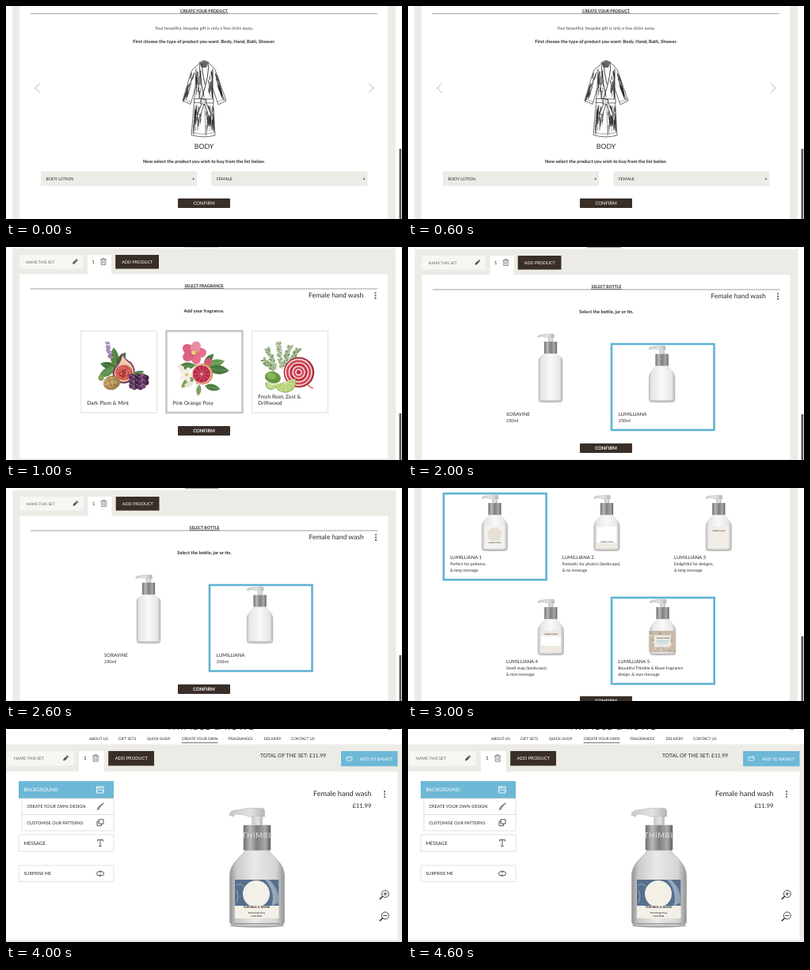
These frames come from a looping animation (500 px wide and 270 px high, 5 s). An HTML page:

```html
<!DOCTYPE html>
<html lang="en">
<head>
<meta charset="utf-8">
<title>Gift set builder</title>
<style>
  html, body { margin: 0; width: 100%; height: 100%; overflow: hidden; background: #fff; }
  svg { display: block; width: 500px; height: 270px; }
  text { font-family: Lato, "Open Sans", sans-serif; text-rendering: geometricPrecision; white-space: pre; }
</style>
</head>
<body>
<svg id="stage" viewBox="0 0 500 270" xmlns="http://www.w3.org/2000/svg">
  <defs>
    <linearGradient id="glass">
      <stop offset="0" stop-color="#bdbdbd"/><stop offset=".1" stop-color="#e6e6e6"/>
      <stop offset=".5" stop-color="#f9f9f9"/><stop offset=".88" stop-color="#e6e6e6"/>
      <stop offset="1" stop-color="#b4b4b4"/>
    </linearGradient>
    <linearGradient id="frost">
      <stop offset="0" stop-color="#8f9191"/><stop offset=".12" stop-color="#c9caca"/>
      <stop offset=".45" stop-color="#e9e9e9"/><stop offset=".85" stop-color="#d3d4d4"/>
      <stop offset="1" stop-color="#929494"/>
    </linearGradient>
    <linearGradient id="steel">
      <stop offset="0" stop-color="#6d6d6d"/><stop offset=".25" stop-color="#b9b9b9"/>
      <stop offset=".5" stop-color="#7f7f7f"/><stop offset=".8" stop-color="#a9a9a9"/>
      <stop offset="1" stop-color="#5d5d5d"/>
    </linearGradient>
    <linearGradient id="pump">
      <stop offset="0" stop-color="#c9c9c9"/><stop offset=".6" stop-color="#e2e2e2"/>
      <stop offset="1" stop-color="#b5b5b5"/>
    </linearGradient>
  </defs>
</svg>
<script>
const GREY = '#ecebe6', DARK = '#392e28', INK = '#2a2827', BLUE = '#5fb2d5';
const STEP = 1000;

const rect = (x, y, w, h, fill, more = '') =>
  `<rect x="${x}" y="${y}" width="${w}" height="${h}" fill="${fill}" ${more}/>`;
const frame = (x, y, w, h, color, width) =>
  rect(x, y, w, h, '#fff', `stroke="${color}" stroke-width="${width}"`);
const circle = (x, y, r, fill, more = '') =>
  `<circle cx="${x}" cy="${y}" r="${r}" fill="${fill}" ${more}/>`;
const oval = (x, y, rx, ry, fill, turn = 0) =>
  `<ellipse cx="${x}" cy="${y}" rx="${rx}" ry="${ry}" fill="${fill}" transform="rotate(${turn} ${x} ${y})"/>`;
const shape = (d, fill, more = '') => `<path d="${d}" fill="${fill}" ${more}/>`;
const line = (d, color = '#555', width = .7) =>
  shape(d, 'none', `stroke="${color}" stroke-width="${width}" stroke-linecap="round" stroke-linejoin="round"`);
const group = (move, body) => `<g transform="${move}">${body}</g>`;
const zoomed = (x, y, s, body) => group(`translate(${x} ${y}) scale(${s}) translate(${-x} ${-y})`, body);
const text = (x, y, size, str, { color = INK, weight = 400, anchor = 'start', gap = 0 } = {}) =>
  `<text x="${x}" y="${y}" font-size="${size}" fill="${color}" font-weight="${weight}" text-anchor="${anchor}"` +
  ` letter-spacing="${gap}">${str.replace(/&/g, '&amp;')}</text>`;
const mid = (y, size, str, style) => text(250, y, size, str, { anchor: 'middle', ...style });
const hint = (y, str) => mid(y, 5.83, str, { weight: 700 });
const times = (n, fn) => Array.from({ length: n }, (_, i) => fn(i)).join('');

function random(seed) {
  return () => (seed = (seed * 16807) % 2147483647) / 2147483647;
}

// Page furniture

const sides = () => rect(8, 0, 484, 270, GREY) + rect(17, 0, 465, 270, '#fff');
const scrollbar = y => rect(496.5, y, 2.7, 270 - y, '#5a5a5a');
const confirm = (y, weight = 700) =>
  rect(217, y, 66, 12, DARK, 'rx=".8"') + mid(y + 8.1, 5.9, 'CONFIRM', { color: '#fff', weight });
const dots = (x, y) => times(3, i => circle(x, y + i * 3.3, 1.05, '#555'));

function heading(y, str, half) {
  return mid(y, 5.1, str, { weight: 700, color: '#222' }) +
    line(`M31 ${y + 2}H468.5`, '#777', .7) + line(`M${250 - half} ${y + 1.3}H${250 + half}`, '#333', .7);
}

const pencil = (x, y) => group(`translate(${x} ${y}) rotate(45)`,
  rect(-1.3, -4, 2.6, 1.4, '#444') + shape('M-1.3 -2.1H1.3V2L0 4.2L-1.3 2Z', '#555'));

const bin = (x, y) => group(`translate(${x} ${y})`,
  line('M-3.6 -2.6H3.6M-1.3 -2.8V-4H1.3V-2.8M-2.8 -2.4V4H2.8V-2.4M-1 -.8V2.4M1 -.8V2.4', '#555', .65));

function tabs() {
  return rect(17, 10, 80, 17.6, '#f7f6f3') +
    text(25.3, 20.6, 4.9, 'NAME THIS SET', { color: '#666' }) + pencil(87, 18.8) +
    rect(103, 10, 30, 26, '#fff') + text(108.6, 20.6, 6, '1') + bin(123, 18.5) +
    rect(138.2, 10, 54.8, 17.6, DARK) + text(146.3, 20.7, 5.4, 'ADD PRODUCT', { color: '#fff' });
}

function builder(title, half, note) {
  return rect(8, 1.7, 484, 270, GREY) + rect(17, 34.3, 465, 233.7, '#fff') + tabs() +
    heading(51, title, half) + text(382, 64, 8.6, 'Female hand wash') + dots(466.5, 58.3) + hint(83, note);
}

// Robe sketch

function robe() {
  const rnd = random(41);
  const strokes = (n, at, len, tilt) => times(n, () => {
    const [x, y] = at(rnd(), rnd());
    const l = len * (.4 + rnd());
    return line(`M${x} ${y}l${tilt * l} ${l}`, '#222', .3 + rnd() * .6);
  });
  return line('M244.5 72Q249 67 255 71L261 77Q264 79 266 86L278 120L268 125L261 104L262 128L264 164Q249 168 234 163.5L237.5 122L239 104L233 124.5L223 120L233 86Q235 79 240 77Z', '#333', .7) +
    shape('M245 73Q249 67 255 72L253 78H247Z', '#666') +
    line('M245 71Q243 82 250 115M255 71Q258 84 247 117M247 73Q248 85 251 99M240 80L239 104M261 80V104', '#222', .85) +
    line('M224 117.5L233.5 121.5M277 117.5L267.5 121.5M251 126L252 164M234.5 160Q249 164.5 263.5 160', '#555', .55) +
    strokes(26, (a, b) => [240.5 + a * a * 6, 82 + b * 27], 8, 0) +
    strokes(26, (a, b) => [260.5 - a * a * 6, 82 + b * 27], 8, 0) +
    strokes(26, (a, b) => [234 + a * 4 - b * 8, 84 + b * 28], 8, -.3) +
    strokes(30, (a, b) => [266 - a * 3 + b * 7, 84 + b * 28], 8, .3) +
    strokes(40, (a, b) => [239 - b * 2.5 + a * a * 9, 125 + b * 30], 9, -.06) +
    strokes(50, (a, b) => [261.5 - a * a * 10 + b, 125 + b * 30], 9, .03) +
    shape('M237.5 117.5L262 118L262 123L237.5 122.5Z', '#fff', 'stroke="#333" stroke-width=".7"') +
    shape('M246 117L253 119L252 125L246 124Z', '#ddd', 'stroke="#222" stroke-width=".9"') +
    shape('M247 124L242 137L245.5 138L250 125M251 124L256 140L259 138L253 123', '#fff', 'stroke="#333" stroke-width=".8"');
}

// Bottles: base at (x, y), about 70 units tall

function bottle(x, y, s, { h = 45, drop = 15, half = 16.2, fill = 'glass', label = '' } = {}) {
  const body = `M-7 ${-h}C-7 ${2.5 - h} ${-half} ${drop * .45 - h} ${-half} ${drop - h}V-3Q${-half} 0 ${3 - half} 0` +
    `H${half - 3}Q${half} 0 ${half} -3V${drop - h}C${half} ${drop * .45 - h} 7 ${2.5 - h} 7 ${-h}Z`;
  return group(`translate(${x} ${y}) scale(${s})`,
    oval(0, 0, half, 1, '#aaa') +
    shape(`M-16.5 ${-h - 21}Q-16 ${-h - 24} -11 ${-h - 24}L-6 ${-h - 25}H3Q4.5 ${-h - 25} 4.5 ${-h - 23}V${-h - 20}H-5Q-8 ${-h - 21.5} -13 ${-h - 21.5}L-14 ${-h - 20}Z`, 'url(#pump)', 'stroke="#aaa" stroke-width=".25"') +
    rect(-3.2, -h - 20, 6.4, 5, 'url(#pump)') +
    shape(body, `url(#${fill})`, 'stroke="#aaa" stroke-width=".4"') +
    rect(-8.1, -h - 15, 16.2, 15, 'url(#steel)', 'rx=".6"') +
    line(`M-8 ${-h - 10.5}H8`, '#999', .25) + line(`M${3 - half} -1.2H${half - 3}`, '#888', .6) + label);
}

const brand = y => text(0, y, 1.9, 'THIMBLE & ROWE', { anchor: 'middle', weight: 700 });
const paper = color => rect(-12.5, -30, 25, 28, color);
const labels = [
  paper('#f3f2ef') + circle(0, -20, 9, '#e6e0d5') + rect(-12.5, -12, 25, 4.5, '#f5f3ef') + brand(-9),
  paper('#fff') + rect(-12.5, -9.5, 25, 7.5, '#eee9e1') + brand(-10.5),
  paper('#f1ede6') + brand(-24.5),
  paper('#eee9e1') + rect(-12.5, -23, 25, 12, '#fff') + brand(-25.5),
  floral(),
];

function floral() {
  const rnd = random(9);
  return rect(-17.5, -30, 34, 27, '#c9bbaa') +
    times(26, () => oval(-16 + rnd() * 31, -29 + rnd() * 25, 2.2, .7, rnd() > .5 ? '#e6ddd2' : '#a99a8b', rnd() * 180)) +
    rect(-11, -24.5, 21, 15, '#eeeae3') + brand(-20) + rect(-8, -17.5, 16, 1.3, '#a9cdda') + rect(-7, -14.5, 14, 1, '#a9cdda');
}

function offer(x, y, name, lines, art, picked) {
  return (picked ? frame(x - 8.2, y - 83, 129.6, 109.3, BLUE, 2.6) : '') +
    bottle(x + 56.3, y - 11, 1, { label: art }) + text(x, y, 6, name) +
    lines.map((l, i) => text(x, y + 8 + i * 7.6, 5.2, l)).join('');
}

// Fragrance pictures

const leaf = (x, y, len, turn, color = '#4f8140') => group(`translate(${x} ${y}) rotate(${turn})`,
  shape(`M0 0Q${len * .45} ${len * -.42} ${len} 0Q${len * .45} ${len * .42} 0 0`, color) + line(`M1 0H${len - 1}`, '#a9c48e', .4));

function figs() {
  const rnd = random(7);
  return leaf(137, 151, 27, -95) + leaf(139, 153, 24, 195, '#3e7038') + leaf(137, 152, 27, 150, '#5e9150') + leaf(139, 149, 22, -55, '#39693a') +
    line('M133 151L127 122', '#6c8a56', .8) +
    times(45, () => { const k = rnd(); return oval(125 + k * 6 + (rnd() - .5) * 6, 117 + k * 23, 1.5, 1.1, rnd() > .5 ? '#9677ad' : '#bca2c7', 40); }) +
    shape('M146 132Q151 141 159 145Q168 155 162 169Q151 179 139 172Q129 163 136 152Q143 145 146 132', '#75405f') +
    shape('M147 135Q151 143 158 147Q166 156 160 168Q150 176 140 170Q132 162 138 153Q145 146 147 135', '#f0cdb0') +
    oval(149, 159.5, 12, 11, '#cf5550') + oval(149, 161, 7, 6, '#b23a40') +
    times(55, () => { const a = rnd() * 6.3, r = 3 + rnd() * 8; return circle(149 + r * Math.cos(a), 159 + r * Math.sin(a), .6, '#f0b08c'); }) +
    leaf(159, 166, 20, -25, '#5c8148') +
    times(17, i => {
      const x = 160 + (i % 6) * 4, y = 165 + Math.floor(i / 6) * 6.5 + (i % 2) * 2;
      return circle(x, y, 4, ['#563156', '#774776', '#402442'][i % 3]) + circle(x - 1, y - 1.5, .9, '#b591b4');
    }) +
    oval(132, 174, 12, 10, '#a7844f', -15) + oval(130, 173, 9, 7, '#c7a66c', -15) +
    line('M122 175Q131 165 141 171M124 179Q132 175 141 178M128 167Q128 173 133 181M136 167Q134 173 137 180', '#7a5b34', .7) +
    circle(117, 167, 4, '#86a057');
}

function blossom() {
  const petal = a => oval(237 + 8 * Math.cos(a), 134 + 7 * Math.sin(a), 8, 6.3, ['#e4708c', '#ec8fa3', '#dc6080'][Math.round(a * 2) % 3], a * 57.3);
  return leaf(239, 150, 22, 175) + leaf(252, 151, 25, -15, '#6b9a55') + leaf(254, 154, 28, 6, '#487941') + leaf(238, 164, 22, 140, '#769d5b') +
    leaf(250, 149, 18, -48, '#3f7040') + line('M241 174Q241 155 237 139', '#5f7b45', 1) +
    times(5, i => petal(i * 1.257)) + circle(237, 134, 2.8, '#f4cd71') + times(7, i => circle(237 + 3.5 * Math.cos(i), 134 + 3.5 * Math.sin(i), .6, '#b64b59')) +
    oval(255, 146, 4.5, 5.5, '#d85975', 25) +
    times(5, i => oval(228 + 5 * Math.cos(i * 1.257), 162 + 5 * Math.sin(i * 1.257), 5, 3.1, '#f4efe3', i * 72)) + circle(228, 162, 2, '#dfbd64') +
    oval(221, 153, 5, 3, '#f0e8dc', 35) + oval(231, 174, 6, 3, '#ece4d2', -20) +
    circle(248, 161, 13.2, '#d98a55') + circle(247, 161, 12.1, '#f0cdbd') + circle(247, 161, 11, '#b92a4a') +
    times(10, i => line(`M247 161L${247 + 10.5 * Math.cos(i * .628)} ${161 + 10.5 * Math.sin(i * .628)}`, '#e08c96', .6)) + circle(247, 161, 1.2, '#f1c8bd') +
    leaf(251, 176, 20, 12, '#4d7e43') + leaf(244, 174, 15, 95, '#799c60');
}

function beet() {
  const rnd = random(23);
  const sprig = (x, y, turn, len) => group(`translate(${x} ${y}) rotate(${turn})`,
    line(`M0 0V${-len}`, '#7b7b52', .7) + times(24, i => leaf(0, -len * (i + 1) / 24, 3 + rnd() * 3, i % 2 ? -35 : 215, ['#6f965b', '#4d7846', '#96ae77'][i % 3])));
  const wedge = (x, y, r, turn) => group(`translate(${x} ${y}) rotate(${turn})`,
    shape(`M${-r} 0A${r} ${r} 0 0 0 ${r} 0Z`, '#72a23f') + shape(`M${1.2 - r} 0A${r - 1.2} ${r - 1.2} 0 0 0 ${r - 1.2} 0Z`, '#e7edc0') +
    shape(`M${2.4 - r} .7A${r - 2.4} ${r - 2.4} 0 0 0 ${r - 2.4} .7Z`, '#b5d173') + times(4, i => line(`M0 .5L${(r - 3) * Math.cos(.6 * (i + 1))} ${(r - 3) * Math.sin(.6 * (i + 1))}`, '#edf2cc', .6)));
  return sprig(340, 155, -24, 31) + sprig(347, 154, -6, 36) + sprig(349, 153, 18, 31) + sprig(338, 157, -46, 22) + sprig(357, 149, 30, 25) +
    oval(335, 166, 11, 8, '#679540', 15) + oval(333, 164, 7, 4.5, '#89b657', 15) +
    circle(371, 159, 21, '#b12c3d') +
    [18.8, 14, 9.2, 4.8].map((r, i) => circle(370.5, 159, r, '#f4dddb') + circle(370.5, 159, r - 1.8, i % 2 ? '#c52d43' : '#d2475a')).join('') +
    line('M383 176Q386 180 390 181', '#b12c3d', 1.2) + wedge(352, 172, 15, -16) + wedge(333, 175, 8, 18);
}

const card = (x, art, lines, border = '#ebebe8', width = 1.8) =>
  frame(x, 106.5, 96, 103.5, border, width) + art +
  lines.map((l, i) => text(x + 7.8, 200 - (lines.length - 1 - i) * 7.6, 6.7, l)).join('');

// Screens

function productScreen() {
  const select = (x, str) => rect(x, 209.5, 197, 18.7, GREY) + text(x + 6.6, 220.6, 5.2, str) +
    shape(`M${x + 191.3} 218.5h2.8l-1.4 2Z`, '#444');
  return sides() + heading(7.7, 'CREATE YOUR PRODUCT', 30) +
    mid(29.5, 5.4, 'Your beautiful, bespoke gift is only a few clicks away.', { color: '#444' }) +
    hint(46.7, 'First choose the type of product you want: Body, Hand, Bath, Shower.') +
    line('M42.3 98.5L36.7 104L42.3 109.5M458.3 98.5L464 104L458.3 109.5', '#aaa', .9) + robe() +
    mid(180.7, 8.8, 'BODY') + hint(199.3, 'Now select the product you wish to buy from the list below.') +
    select(44, 'BODY LOTION') + select(259.3, 'FEMALE') + confirm(244, 400) + scrollbar(181);
}

function fragranceScreen() {
  return rect(226, 0, 42, .7, '#ccc') + builder('SELECT FRAGRANCE', 25, 'Add your fragrance.') +
    card(94.5, zoomed(148, 156, .9, figs()), ['Dark Plum & Mint']) +
    card(202.5, blossom(), ['Pink Orange Posy'], '#c6c6c4', 2.6) +
    card(310.5, zoomed(358, 157, .92, beet()), ['Fresh Root, Zest &', 'Driftwood']) + confirm(227) + scrollbar(211);
}

function bottleScreen() {
  const caption = (x, str) => text(x, 214.3, 6.1, str) + text(x, 222, 5.4, '250ml');
  return group('translate(.5 1)', builder('SELECT BOTTLE', 19, 'Select the bottle, jar or tin.')) +
    rect(226, 0, 43, 1.3, '#aaa') + bottle(180, 196, 1, { h: 61, drop: 8, half: 15 }) + caption(124, 'SORAVINE') +
    frame(257, 123, 129.5, 109, BLUE, 2.6) + bottle(320.6, 196, 1.01) + caption(265.8, 'LUMILLIANA') +
    confirm(249) + scrollbar(212);
}

function styleScreen() {
  return sides() + [
    [53.2, 90, ['Perfect for patterns,', '& long message'], true],
    [194.7, 90, ["Fantastic for photo's (landscape),", '& no message']],
    [336, 90, ['Delightful for designs,', '& long message']],
    [124, 222, ['Small snap (landscape),', '& mini message']],
    [265.3, 222, ['Beautiful Thimble & Rowe fragrance', 'design ,& max message'], true],
  ].map(([x, y, lines, picked], i) => offer(x, y, `LUMILLIANA ${i + 1}`, lines, labels[i], picked)).join('') +
    confirm(264) + scrollbar(188);
}

function menuRow(x, y, h, size, str, icon, on) {
  return rect(x, y, 136 - x, h, on ? '#6db8d6' : '#fff', on ? '' : 'stroke="#d5d5d3" stroke-width=".7"') +
    text(x + 6.4, y + h / 2 + 2, size, str, { color: on ? '#fff' : INK }) +
    group(`translate(119 ${y + h / 2})`, line(icon, on ? '#fff' : '#444', .9));
}

const zoom = (y, sign) => group(`translate(478.8 ${y})`,
  circle(0, 0, 4.5, '#fff', 'stroke="#333" stroke-width=".9"') + line(sign, '#333', .9) + line('M-3.3 3.3L-6.6 6.5', '#333', 1.6));

function designLabel() {
  const print = (y, size, str, weight) => text(316.5, y, size, str, { anchor: 'middle', weight });
  return rect(289, 191, 55.5, 49, '#f3f0e8') + rect(289, 191, 55.5, 33, '#566f8d') +
    shape('M332 191Q345 202 344.5 220L335 224Q341 207 327 191Z', '#8fa3b6') +
    line('M291 198Q297 194 300 200M333 194Q341 207 338 223M291 220Q295 212 291 204', '#a9bac8', .8) +
    circle(316, 209, 17, '#f3f0e8') + print(227.2, 3.9, 'THIMBLE & ROWE', 700) +
    print(233.8, 2.7, 'Pink Orange Posy', 700) + print(238, 2.7, 'Hand Wash', 700);
}

function designScreen() {
  const nav = [[105, 'ABOUT US'], [142, 'GIFT SETS'], [178, 'QUICK SHOP'], [222, 'CREATE YOUR OWN'],
    [280.5, 'FRAGRANCES'], [325.5, 'DELIVERY'], [360, 'CONTACT US']];
  return rect(0, 19.4, 500, 251, GREY) + rect(0, 54, 494.5, 213, '#fff') +
    text(203, 1.2, 11, 'THIMBLE & ROWE', { gap: 1.2 }) + rect(482, 0, 5, .8, '#888') +
    nav.map(([x, str]) => text(x, 14.2, 4.8, str)).join('') + line('M222 17.4H267', '#444', .8) +
    group('translate(-16.6 17.4) scale(1.055)', tabs()) +
    text(321, 36.2, 6.75, 'TOTAL OF THE SET: £11.99') + rect(423, 28, 71.5, 19.3, '#6db8d6') +
    line('M430 36H437.4L436.4 40H431ZM432 36V34.5M435.4 36V34.5', '#fff', .7) +
    text(446.7, 39.7, 5.4, 'ADD TO BASKET', { color: '#fff' }) +
    menuRow(16, 66, 22, 6.2, 'BACKGROUND', 'M-4 -4H4V4H-4ZM-4 2L-1 -1L1 1L2 0L4 2M1.5 -2H2M-4 -2.5H0', true) +
    menuRow(20, 88, 20.3, 5.55, 'CREATE YOUR OWN DESIGN', 'M4 -4L-.5 1L-1.5 0L4 -4M-1.5 .5Q-3 .5 -3 2Q-3 3.5 -4 4Q-1 4.5 -.5 1.5') +
    menuRow(20, 108.3, 20.7, 5.4, 'CUSTOMISE OUR PATTERNS', 'M-1.5 -4H4V1.5H-1.5ZM-1.5 -1.5H-4V4H1.5V1.5') +
    menuRow(16, 134, 21, 6.1, 'MESSAGE', 'M-3.5 -2.5V-4H3.5V-2.5M0 -4V4M-1.3 4H1.3') +
    menuRow(16, 173, 20.5, 5.5, 'SURPRISE ME', 'M-1 2.5H-2A2.5 2.5 0 0 1 -2 -2.5H1L-.3 -3.8M1 -2.5L-.3 -1.2M1 -2.5H2A2.5 2.5 0 0 1 2 2.5H-1L.3 3.8M-1 2.5L.3 1.2') +
    bottle(317, 249.5, 2.13, { fill: 'frost' }) +
    `<svg x="299.8" y="120" width="34.4" height="33">${text(-2, 18.3, 9.4, 'THIMBLE', { color: '#e3e3e3', gap: .7 })}</svg>` +
    designLabel() + text(388, 85.3, 9.1, 'Female hand wash') + text(461.5, 100, 7.7, '£11.99', { anchor: 'end' }) +
    dots(478, 79.4) + zoom(209, 'M-2 0H2M0 -2V2') + zoom(236.5, 'M-2 0H2');
}

const screens = [productScreen, fragranceScreen, bottleScreen, styleScreen, designScreen];
const stage = document.getElementById('stage');
stage.insertAdjacentHTML('beforeend', screens.map(draw => `<g class="screen" display="none">${draw()}</g>`).join(''));
const layers = [...stage.querySelectorAll('.screen')];
const start = performance.now();

function play() {
  const now = Math.floor((performance.now() - start) / STEP) % layers.length;
  layers.forEach((layer, i) => layer.setAttribute('display', i === now ? 'inline' : 'none'));
  requestAnimationFrame(play);
}
play();
</script>
</body>
</html>
```
